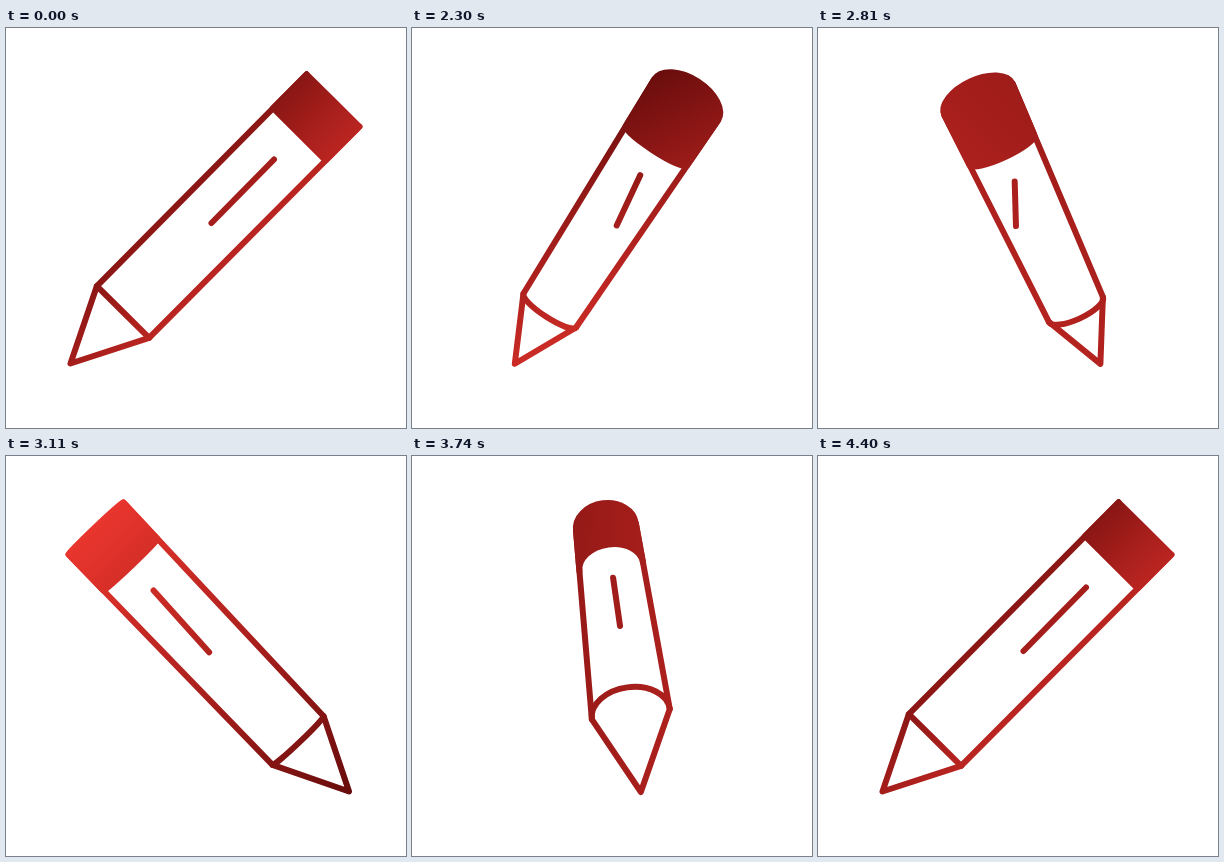
Write an HTML page with a canvas that moves like this. It is 400 px wide and 400 px high and loops after 4.43 s.

```html
<!DOCTYPE html>
<html lang="en">
<head>
<meta charset="utf-8">
<title>Turning pencil</title>
<style>
  html, body { margin: 0; width: 100%; height: 100%; overflow: hidden; background: #fff; }
  canvas { display: block; width: 400px; height: 400px; }
</style>
</head>
<body>
<canvas id="stage"></canvas>
<script>
const LOOP = 4430, START = 2000, STEP = 30, TURN = 80;
const MID_X = 205.5, PIVOT = [205, 195];

// Light over one turn: angle, level at the pivot, slope in x and y per pixel
const LIGHT = [
  [0, 0.47, 0.0031, 0.0031],
  [81, 0.5, 0.0002, 0.0031],
  [166.5, 0.57, -0.0018, -0.0018],
  [261, 0.45, 0.0015, 0.0001],
  [315, 0.45, 0.0015, 0.001],
  [360, 0.47, 0.0031, 0.0031]
];

const canvas = document.getElementById('stage');
const ctx = canvas.getContext('2d');
const ratio = window.devicePixelRatio || 1;
canvas.width = canvas.height = 400 * ratio;
ctx.scale(ratio, ratio);

const mix = (a, b, k) => a + (b - a) * k;

function lightAt(deg) {
  const i = LIGHT.findIndex((row, n) => n > 0 && deg <= row[0]);
  const a = LIGHT[i - 1], b = LIGHT[i];
  const k = (deg - a[0]) / (b[0] - a[0]);
  return a.map((v, n) => mix(v, b[n], k)).slice(1);
}

function paint(deg) {
  const [level, gx, gy] = lightAt(deg);
  const size = gx * gx + gy * gy;
  const at = l => [PIVOT[0] + gx * (l - level) / size, PIVOT[1] + gy * (l - level) / size];
  const fill = ctx.createLinearGradient(...at(0), ...at(1));
  fill.addColorStop(0, '#5e0a0a');
  fill.addColorStop(0.5, '#a81f1c');
  fill.addColorStop(1, '#e8352d');
  return fill;
}

function pose(deg) {
  const t = deg * Math.PI / 180;
  const s = Math.sin(t), q = s * s, o = (s + s * q) / 2;
  const swing = (r, b) => MID_X + r * (mix(Math.cos(t), Math.cos(3 * t), b));
  const ring = {
    x: swing(-88.5, -0.02 - 0.03 * s), y: 284 + 11.4 * o - 15.1 * q,
    w: 36.8 - 5.6 * s - 3.1 * q, sag: -20.5 * o + 7.2 * q
  };
  const cap = {
    x: swing(121.5, 0.1), y: 72.5 - 1.5 * q,
    w: 37.2 + 3.6 * s - 3.6 * q,
    sag: Math.max((26 + 1.5 * s) * q, 18 * s * (1 + Math.cos(t)))
  };
  const k = 0.84 - 0.025 * s - 0.082 * q;
  const band = {
    x: mix(ring.x, cap.x, k), y: mix(ring.y, cap.y, k),
    w: mix(ring.w, cap.w, k), sag: -17 * o + 6.6 * q
  };
  return {
    ring, cap, band,
    tip: [swing(-141, -0.015), 335.5 + 0.5 * q],
    mark: [
      [MID_X - 3.8 * s - 2.2 * q + 3 * Math.sin(2 * t), 195 + 14.8 * o - 10.8 * q],
      [swing(62.5, 0.2 + 0.06 * s), 131.5 + 20 * o + 10 * q]
    ],
    tilt: Math.atan2(cap.x - ring.x, ring.y - cap.y)
  };
}

function draw(deg) {
  const { ring, cap, band, tip, mark, tilt } = pose(deg);
  const edge = (c, side) => [
    c.x + side * c.w * Math.cos(tilt), c.y + side * c.w * Math.sin(tilt)
  ];
  // Half ellipse across the body; a positive sag bends towards the eraser
  const arc = (c, back) => {
    const up = c.sag > 0, from = back ? 0 : Math.PI;
    ctx.ellipse(c.x, c.y, c.w, Math.abs(c.sag), tilt, from, Math.PI - from, back ? up : !up);
  };
  const line = (...points) => {
    ctx.beginPath();
    points.forEach(p => ctx.lineTo(...p));
    ctx.stroke();
  };

  ctx.fillStyle = '#fff';
  ctx.fillRect(0, 0, 400, 400);
  ctx.fillStyle = ctx.strokeStyle = paint(deg);
  ctx.lineWidth = 6;
  ctx.lineCap = ctx.lineJoin = 'round';

  line(edge(cap, -1), edge(ring, -1), tip, edge(ring, 1), edge(cap, 1));
  ctx.beginPath();
  arc(ring);
  ctx.stroke();

  ctx.beginPath();
  arc(cap);
  arc(band, true);
  ctx.closePath();
  ctx.fill();
  ctx.stroke();

  line(...mark);
}

function tick() {
  const time = performance.now() % LOOP;
  const step = Math.floor((time - START) / STEP);
  draw(Math.min(Math.max(step, 0), TURN) % TURN * 360 / TURN);
  requestAnimationFrame(tick);
}
tick();
</script>
</body>
</html>
```
